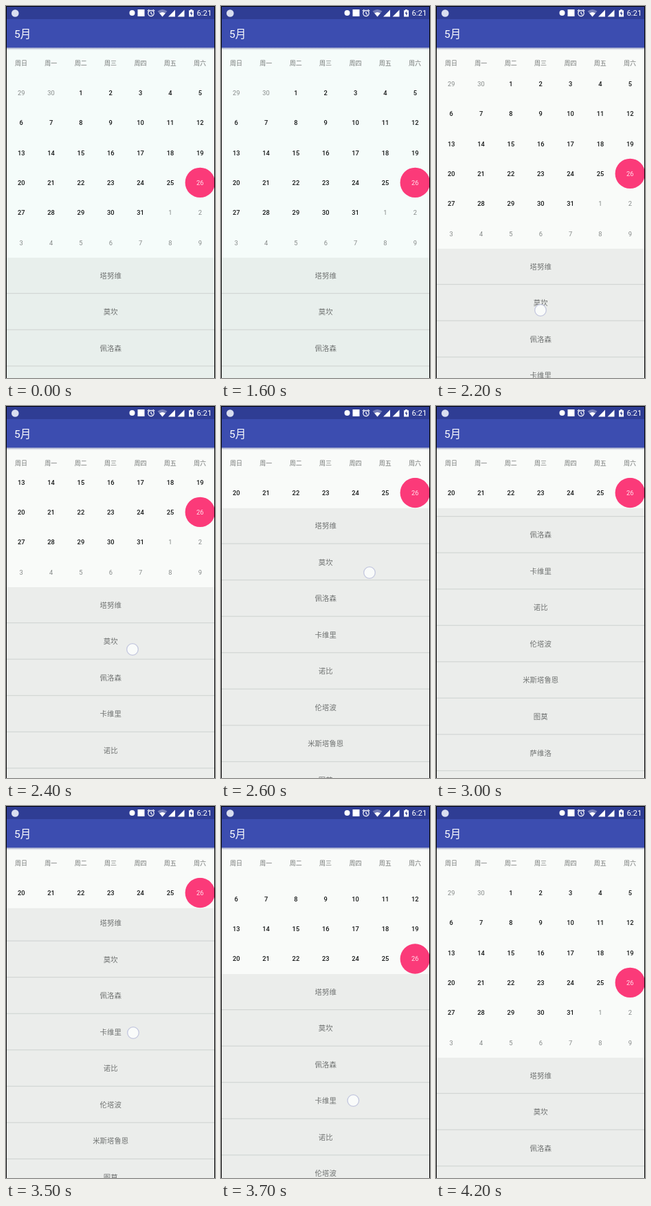
These frames come from a looping animation (304x538 px, 5000 ms). An HTML page:

```html
<!DOCTYPE html>
<html lang="zh-CN">
<head>
<meta charset="utf-8">
<title>Collapsing calendar</title>
<style>
  html, body { margin: 0; width: 100%; height: 100%; overflow: hidden; }
  svg { display: block; }
  text { font-family: Roboto, "Noto Sans CJK SC", "Noto Sans CJK", sans-serif; text-anchor: middle; }
  .left { text-anchor: start; fill: #fff; }
  .week { font-size: 9px; fill: #737675; }
  .day { font-size: 9.3px; font-weight: 500; fill: #151717; }
  .day.other { font-weight: 400; fill: #858988; }
  .day.chosen { font-weight: 400; fill: #ffe4ee; }
  .item { font-size: 10.4px; fill: #707372; }
</style>
</head>
<body>
<svg id="stage" width="304" height="538" viewBox="0 0 304 538">
  <defs>
    <linearGradient id="shadow" x2="0" y2="1">
      <stop stop-color="#8d94bd"/>
      <stop offset="1" stop-color="#e6e8f0" stop-opacity="0"/>
    </linearGradient>
  </defs>
  <rect class="paper" width="304" height="538"/>
  <g id="month"></g>

  <g id="header">
    <rect class="paper" y="60" width="304" height="43.8"/>
    <rect y="18" width="304" height="42.5" fill="#3c4db0"/>
    <rect width="304" height="19" fill="#2f3d94"/>
    <rect y="60.5" width="304" height="3.5" fill="url(#shadow)"/>
    <text class="left" x="12" y="46" font-size="15.5">5月</text>
    <text class="left" x="277.5" y="14.3" font-size="11.3">6:21</text>
    <g fill="#fff">
      <circle cx="13.3" cy="10.5" r="5.3" fill="#d9def0"/>
      <circle cx="183.5" cy="10" r="4"/>
      <rect x="191.5" y="5" width="10" height="10"/>
      <g fill="none" stroke="#fff" stroke-width="1.2">
        <circle cx="211" cy="10.5" r="4.2"/>
        <path d="M211 8v3l2 1.2M205.8 7.3l2.6-2.2M216.2 7.3l-2.6-2.2"/>
      </g>
      <path d="M220.5 7.5Q227.5 2.5 234.5 7.5L227.5 15.5Z" opacity=".35"/>
      <path d="M223.2 10.5Q227.5 7.5 231.8 10.5L227.5 15.5Z"/>
      <path d="M236 15.5h10V5.5ZM249.5 15.5h10V5.5Z"/>
      <path d="M266 6.2h2V5h3v1.2h2v9.3h-7Z"/>
      <path d="M270 7.5l-2.5 3.6h1.6v2.9l2.5-3.7H270Z" fill="#2f3d94"/>
    </g>
  </g>

  <svg id="list" width="304" height="400">
    <rect id="listPaper" width="304" height="400"/>
    <g id="items"></g>
  </svg>

  <circle id="touch" r="8.3" fill="#fbfcfc" fill-opacity=".9" stroke="#c3c7de" stroke-width="1.3"/>
  <path d="M.5 538V.5H303.5V538" fill="none" stroke="#000"/>
</svg>

<script>
const $ = id => document.getElementById(id);
const COL = 43.35, ROW = 43.3, ITEM = 52.55;
const WEEK_SHIFT = 3 * ROW, LIST_TOP = 364;
const names = ['塔努维', '莫坎', '佩洛森', '卡维里', '诺比', '伦塔波', '米斯塔鲁恩', '图莫', '萨维洛', '贝尼科'];

function add(parent, tag, attrs, text = '') {
  const el = document.createElementNS('http://www.w3.org/2000/svg', tag);
  for (const key in attrs) el.setAttribute(key, attrs[key]);
  el.textContent = text;
  $(parent).append(el);
}

[...'日一二三四五六'].forEach((name, i) =>
  add('header', 'text', { class: 'week', x: 22 + COL * i, y: 85.6 }, '周' + name));

add('month', 'circle', { cx: 282.3, cy: 255.4, r: 21.7, fill: '#fb3a79' });
for (let i = 0; i < 42; i++) {
  const n = i - 1, inMonth = n > 0 && n < 32;
  const day = n < 1 ? n + 30 : n > 31 ? n - 31 : n;
  const kind = !inMonth ? ' other' : n === 26 ? ' chosen' : '';
  add('month', 'text', {
    class: 'day' + kind,
    x: 22.2 + COL * (i % 7),
    y: 129 + ROW * Math.floor(i / 7)
  }, day);
}

names.forEach((name, i) => {
  add('items', 'text', { class: 'item', x: 152.2, y: 29.6 + ITEM * i }, name);
  add('items', 'rect', { y: 51 + ITEM * i, width: 304, height: 1.2, fill: '#d2d6d4' });
});

// Each track lists [time, value] points joined by straight lines.
const shiftTrack = [[2100, 0], [2200, 13], [2300, 45], [2400, 102], [2500, 165], [2600, 216.5],
  [3500, 216.5], [3600, 172], [3800, 70], [3900, 15], [4000, 0]];
const scrollTrack = [[2700, 0], [2800, 25], [2900, 65], [3000, 92], [3100, 100],
  [3200, 100], [3300, 90], [3400, 50], [3500, 4], [3600, 0]];
const touchX = [[2200, 152], [2600, 216], [2800, 190], [2900, 195], [3300, 180], [3500, 185], [3800, 196]];
const touchY = [[2200, 440], [2300, 408], [2400, 352], [2500, 291], [2600, 241], [2800, 372], [2900, 332],
  [3300, 242], [3400, 282], [3500, 328], [3800, 475]];
const touches = [[2200, 2600], [2800, 2900], [3300, 3800]];

function at(track, t) {
  const i = track.findIndex(p => p[0] >= t);
  if (i < 0) return track[track.length - 1][1];
  if (i === 0) return track[0][1];
  const [t0, a] = track[i - 1], [t1, b] = track[i];
  return a + (b - a) * (t - t0) / (t1 - t0);
}

function draw(now) {
  const t = Math.floor(now % 5000 / 100) * 100;
  const shift = at(shiftTrack, t);
  // The month leads the list when opening again.
  const monthShift = t < 3000
    ? Math.min(shift, WEEK_SHIFT)
    : Math.max(0, WEEK_SHIFT - (216.5 - shift));
  $('month').setAttribute('transform', `translate(0 ${-monthShift})`);
  $('list').setAttribute('y', LIST_TOP - shift);
  $('items').setAttribute('transform', `translate(0 ${-at(scrollTrack, t)})`);

  const touching = touches.some(([start, end]) => t >= start && t <= end);
  $('touch').setAttribute('visibility', touching ? 'visible' : 'hidden');
  $('touch').setAttribute('cx', at(touchX, t));
  $('touch').setAttribute('cy', at(touchY, t));

  const cool = t < 2200;
  document.querySelectorAll('.paper').forEach(el => el.setAttribute('fill', cool ? '#f5fcfa' : '#f9fbf9'));
  $('listPaper').setAttribute('fill', cool ? '#e8efec' : '#ebedeb');
}

const start = performance.now();
function tick() {
  draw(performance.now() - start);
  requestAnimationFrame(tick);
}
tick();
</script>
</body>
</html>
```
